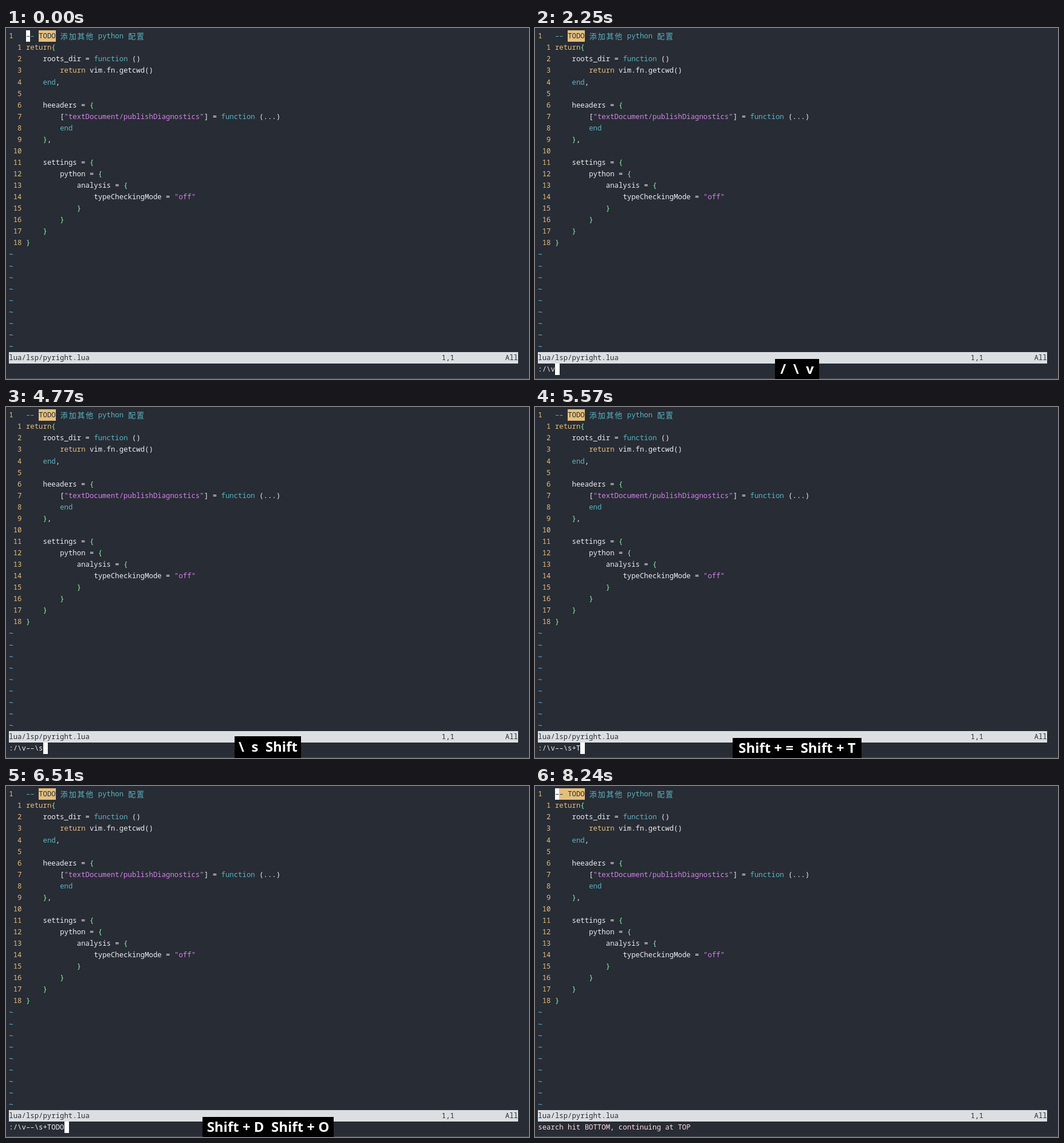
Recreate the animation shown at these times as an HTML page. Size 913 px wide and 613 px high, loop 8570 ms.

```html
<!DOCTYPE html>
<html lang="en">
<head>
<meta charset="utf-8">
<title>Editor search</title>
<style>
  html, body { margin: 0; width: 100%; height: 100%; overflow: hidden; background: #282c34; }
  svg { display: block; width: 913px; height: 613px; }
  rect { shape-rendering: crispEdges; }
  text { white-space: pre; font: 12.34px "Noto Sans Mono", "Noto Sans CJK SC", monospace; font-variant-ligatures: none; }
  text.wide { font: 13px "Noto Sans CJK SC", "Noto Sans CJK", sans-serif; }
  text.tilde { font-family: "DejaVu Sans Mono", monospace; }
  #keys text { font: bold 24px "Open Sans", "Noto Sans", sans-serif; text-anchor: middle; }
</style>
</head>
<body>
<svg id="stage" viewBox="0 0 913 613"></svg>
<script>
const LOOP = 8570;
const CELL = 7.404, LINE = 20.06, LEFT = 5.3, TOP = 4;
const C = {
  bg: '#282c34', fg: '#eceef2', bar: '#dcdfe2', yellow: '#e5c07b', cyan: '#56b6c2',
  green: '#8cf8ae', violet: '#d283ea', tilde: '#5fb6dc', warn: '#ffdfdf', white: '#ffffff'
};

const stage = document.getElementById('stage');

function add(tag, attrs, parent = stage) {
  const el = document.createElementNS('http://www.w3.org/2000/svg', tag);
  for (const key in attrs) el.setAttribute(key, attrs[key]);
  parent.appendChild(el);
  return el;
}

const colX = col => LEFT + col * CELL;
const rowY = row => TOP + row * LINE;
// The terminal draws hyphens almost as wide as a cell.
const wideDash = text => text.replace(/-/g, '–');

function cells(text, row, col, fill) {
  const el = add('text', { x: colX(col), y: rowY(row) + 14.3, fill });
  el.textContent = wideDash(text);
  return el;
}

function block(row, col, count, fill) {
  const x = Math.round(colX(col)), y = Math.round(rowY(row));
  return add('rect', { x, y, width: Math.round(colX(col + count)) - x, height: 20, fill });
}

function han(text, row, col) {
  [...text].forEach((char, i) => {
    const el = add('text', { class: 'wide', x: colX(col + 2 * i) + 0.7, y: rowY(row) + 14.6, fill: C.cyan });
    el.textContent = char;
  });
}

const source = [
  'return{',
  '    roots_dir = function ()',
  '        return vim.fn.getcwd()',
  '    end,',
  '',
  '    heeaders = {',
  '        ["textDocument/publishDiagnostics"] = function (...)',
  '        end',
  '    },',
  '',
  '    settings = {',
  '        python = {',
  '            analysis = {',
  '                typeCheckingMode = "off"',
  '            }',
  '        }',
  '    }',
  '}'
];

function tokenColor(token) {
  if (token[0] === '"') return C.violet;
  if (token === 'return') return C.yellow;
  if (token === 'function' || token === 'end') return C.cyan;
  return /^[{}]$/.test(token) ? C.green : C.fg;
}

function codeLine(line, row) {
  cells(String(row).padStart(3), row, 0, C.yellow);
  let col = 4;
  for (const token of line.split(/("[^"]*"|\breturn\b|\bfunction\b|\bend\b|[{}])/)) {
    if (token.trim()) {
      const indent = token.length - token.trimStart().length;
      cells(token.trim(), row, col + indent, tokenColor(token));
    }
    col += token.length;
  }
}

add('rect', { width: 913, height: 613, fill: C.bg });
add('rect', { y: 612, width: 913, height: 1, fill: '#4b4f57' });

// First line
cells('1', 0, 0, C.yellow);
const match = block(0, 4, 3, C.yellow);
block(0, 7, 4, C.yellow);
const homeCursor = block(0, 4, 1, C.white);
const dashes = [4, 5].map(col => cells('-', 0, col, C.cyan));
cells('TODO', 0, 7, C.bg);
han('添加其他', 0, 12);
cells('python', 0, 21, C.cyan);
han('配置', 0, 28);

source.forEach((line, i) => codeLine(line, i + 1));
for (let row = 19; row < 28; row++) cells('~', row, 0, C.tilde).setAttribute('class', 'tilde');

// Status bar and command line
block(28, 0, 120, C.bar);
cells('lua/lsp/pyright.lua', 28, 0, C.bg);
cells('1,1', 28, 102, C.bg);
cells('All', 28, 117, C.bg);
const commandText = cells('', 29, 0, C.fg);
const commandCursor = block(29, 0, 1, C.white);

// Pressed-key overlay
const CENTER = 457.5, BOTTOM = 613;
const keys = add('g', { id: 'keys' });
const keyBox = add('rect', { fill: '#000' }, keys);
const keyText = add('text', { x: CENTER, fill: C.white }, keys);

const COMMAND = ':/\\v--\\s+TODO';
const MESSAGE = 'search hit BOTTOM, continuing at TOP';

// Each step: time, typed characters, pressed keys, box width
const steps = [
  [0, 0, '', 0],
  [330, 0, 'Shift', 69],
  [550, 1, 'Shift + ;', 105],
  [1500, 1, '', 0],
  [1560, 2, '/', 27],
  [1790, 2, '/  \\', 53],
  [1860, 3, '/  \\', 53],
  [2250, 4, '/  \\  v', 77],
  [2520, 4, '\\  v', 54],
  [2710, 4, 'v', 30],
  [3120, 5, 'v  -', 51],
  [3190, 5, '-', 22],
  [3260, 6, '-', 22],
  [4120, 7, '-  \\', 45],
  [4210, 7, '\\', 27],
  [4380, 7, '\\  s', 50],
  [4450, 8, '\\  s', 50],
  [4770, 8, '\\  s  Shift', 116],
  [4900, 9, '\\  s  Shift + =', 162],
  [5040, 9, 's  Shift + =', 140],
  [5100, 9, 'Shift + =', 116],
  [5300, 9, 'Shift + =  Shift', 182],
  [5500, 9, 'Shift + =  Shift + T', 225],
  [5570, 10, 'Shift + =  Shift + T', 225],
  [5650, 11, 'Shift + =  Shift + T  Shift + O', 341],
  [5790, 12, 'Shift + =  Shift + T  Shift + O  Shift + D', 454],
  [5850, 12, 'Shift + T  Shift + O  Shift + D', 341],
  [5920, 12, 'Shift + T  Shift + O  Shift + D  Shift + O', 454],
  [5990, 13, 'Shift + T  Shift + O  Shift + D  Shift + O', 454],
  [6420, 13, 'Shift + O  Shift + D  Shift + O', 344],
  [6510, 13, 'Shift + D  Shift + O', 229],
  [6710, 13, 'Shift + O', 117],
  [6820, 13, '', 0],
  [7350, 13, 'Enter', 73],
  [7410, 0, 'Enter', 73],
  [8240, 0, '', 0]
];
const FOUND = 7410;

// The box hugs its tallest glyph, so its top depends on the keys.
function boxTop(label) {
  if (/;|\\.*Shift/.test(label)) return 575;
  if (/^[v\- ]+$/.test(label)) return 581;
  return label === 'Enter' ? 579 : 578;
}

const show = (el, on) => el.setAttribute('visibility', on ? 'visible' : 'hidden');

function drawKeys(label, width) {
  show(keys, label !== '');
  if (!label) return;
  const top = boxTop(label);
  keyBox.setAttribute('x', Math.floor(CENTER - width / 2));
  keyBox.setAttribute('y', top);
  keyBox.setAttribute('width', width);
  keyBox.setAttribute('height', BOTTOM - top);
  keyText.setAttribute('y', Math.min(top + 26.5, 604));
  keyText.textContent = label;
}

function render(time) {
  const [, typed, label, width] = steps.findLast(step => step[0] <= time);
  const found = time >= FOUND;
  const home = typed === 0;

  show(match, found);
  show(homeCursor, home);
  dashes[0].setAttribute('fill', home ? C.bg : C.cyan);
  dashes[1].setAttribute('fill', found ? C.bg : C.cyan);

  commandText.textContent = wideDash(found ? MESSAGE : COMMAND.slice(0, typed));
  commandText.setAttribute('fill', found ? C.warn : C.fg);
  show(commandCursor, !home);
  commandCursor.setAttribute('x', Math.round(colX(typed)));

  drawKeys(label, width);
}

const start = performance.now();
function tick() {
  render((performance.now() - start) % LOOP);
  requestAnimationFrame(tick);
}
tick();
</script>
</body>
</html>
```
